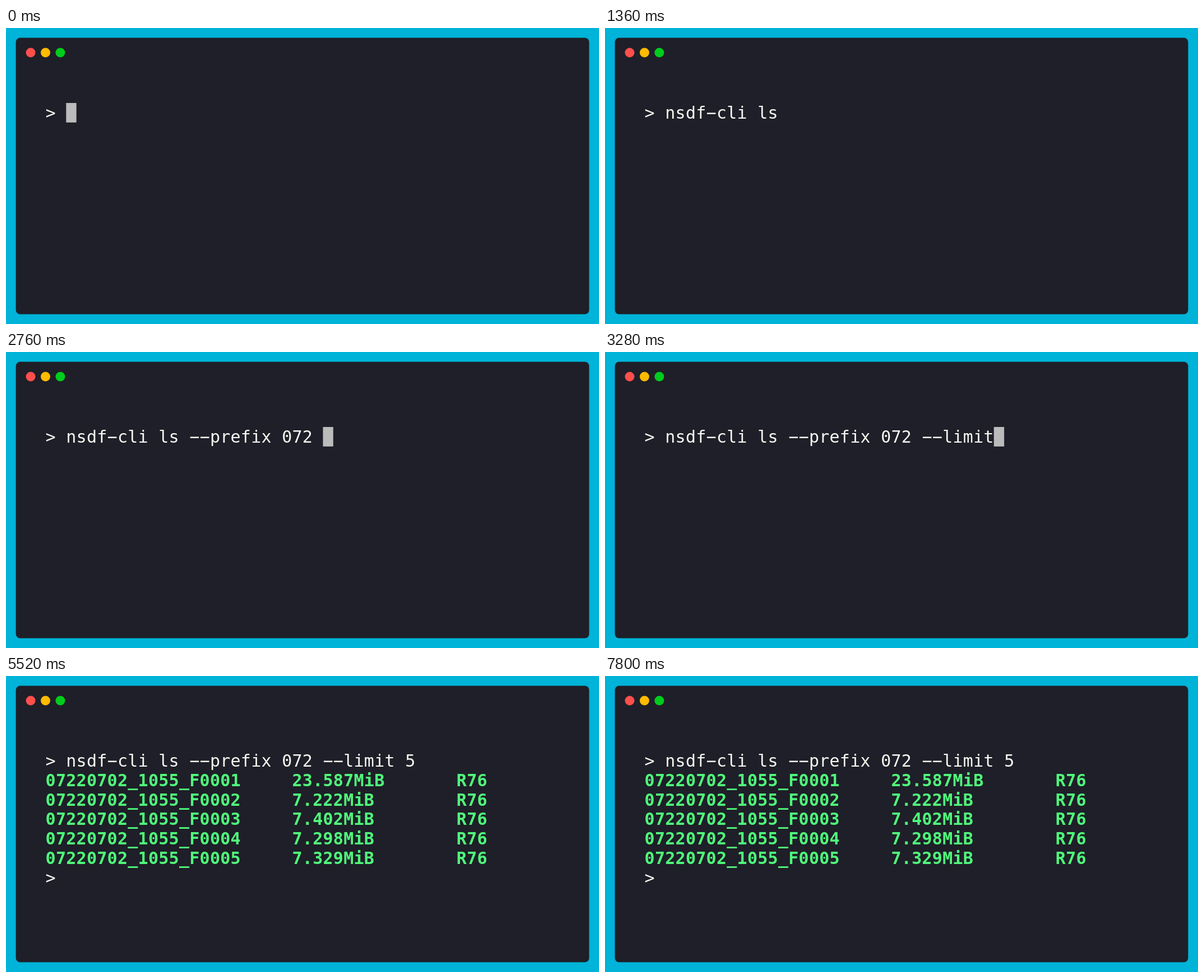
Recreate the animation shown at these times as an HTML page with a canvas. Size 1058 px wide and 529 px high, loop 8000 ms.

```html
<!DOCTYPE html>
<html lang="en">
<head>
<meta charset="utf-8">
<title>Terminal</title>
<style>
  html, body { margin: 0; width: 100%; height: 100%; overflow: hidden; background: #00b3d8; }
  canvas { display: block; }
</style>
</head>
<body>
<canvas width="1058" height="529"></canvas>
<script>
const ctx = document.querySelector('canvas').getContext('2d');
const LOOP = 8000, TICK = 40, KEY = 75;
const LEFT = 70.6, TOP = 134, CELL_W = 18.33, CELL_H = 34.85, ASCENT = 27.8;
const WHITE = '#f8f8f2', GREEN = '#50fa7b';
const FONT = '30px Menlo, "DejaVu Sans Mono", monospace';
const COMMAND = 'nsdf-cli ls --prefix 072 --limit 5';
const SIZES = ['23.587', '7.222', '7.402', '7.298', '7.329'];

function rect(x, y, w, h, r, color) {
  ctx.fillStyle = color;
  ctx.beginPath();
  ctx.roundRect(x, y, w, h, r);
  ctx.fill();
}

function print(text, col, row, color = WHITE, weight = 'normal') {
  ctx.font = weight + ' ' + FONT;
  ctx.fillStyle = color;
  // The minus sign has the wide dash of the terminal face.
  [...text.replace(/-/g, '\u2212')].forEach((ch, i) =>
    ctx.fillText(ch, LEFT + (col + i) * CELL_W, TOP + row * CELL_H + ASCENT));
}

function cursor(col, row) {
  rect(LEFT + col * CELL_W, TOP + row * CELL_H, CELL_W, CELL_H, 0, '#bbbbbb');
}

// Keys pressed by time t in a burst that starts at the given time.
function keys(t, start, count) {
  return Math.max(0, Math.min(count, Math.floor((t - start) / KEY) + 1));
}

function draw(t) {
  rect(0, 0, 1058, 529, 0, '#00b3d8');
  rect(17.6, 17.6, 1022.8, 493.8, 7.5, '#1e1f28');
  ['#ff4f4d', '#febb00', '#00cc1d'].forEach((color, i) =>
    rect(35.5 + i * 26.45, 35.6, 17, 17, 8.5, color));

  // End of the current tick, so a key shows in the tick it falls in.
  const end = t + TICK - 1;
  const typed = keys(end, 45, 11) + keys(end, 1810, 23);
  print('> ' + COMMAND.slice(0, typed), 0, 0);

  if (t < 4480) {
    const off = (t >= 1360 && t < 1800) || t >= 4000;
    if (!off) cursor(2 + typed, 0);
  } else if (t < 4880) {
    cursor(0, 1);
  } else {
    SIZES.forEach((size, i) => {
      const line = `07220702_1055_F000${i + 1}`.padEnd(24) + `${size}MiB`.padEnd(16) + 'R76';
      print(line, 0, i + 1, GREEN, 'bold');
    });
    if (t < 4920) {
      cursor(0, 6);
    } else {
      print('>', 0, 6);
      const blinks = [5520, 6080, 6640, 7240, 7800].filter(b => t >= b).length;
      if (blinks % 2 === 0) cursor(2, 6);
    }
  }
}

function frame() {
  draw(Math.floor(performance.now() % LOOP / TICK) * TICK);
  requestAnimationFrame(frame);
}
frame();
</script>
</body>
</html>
```
